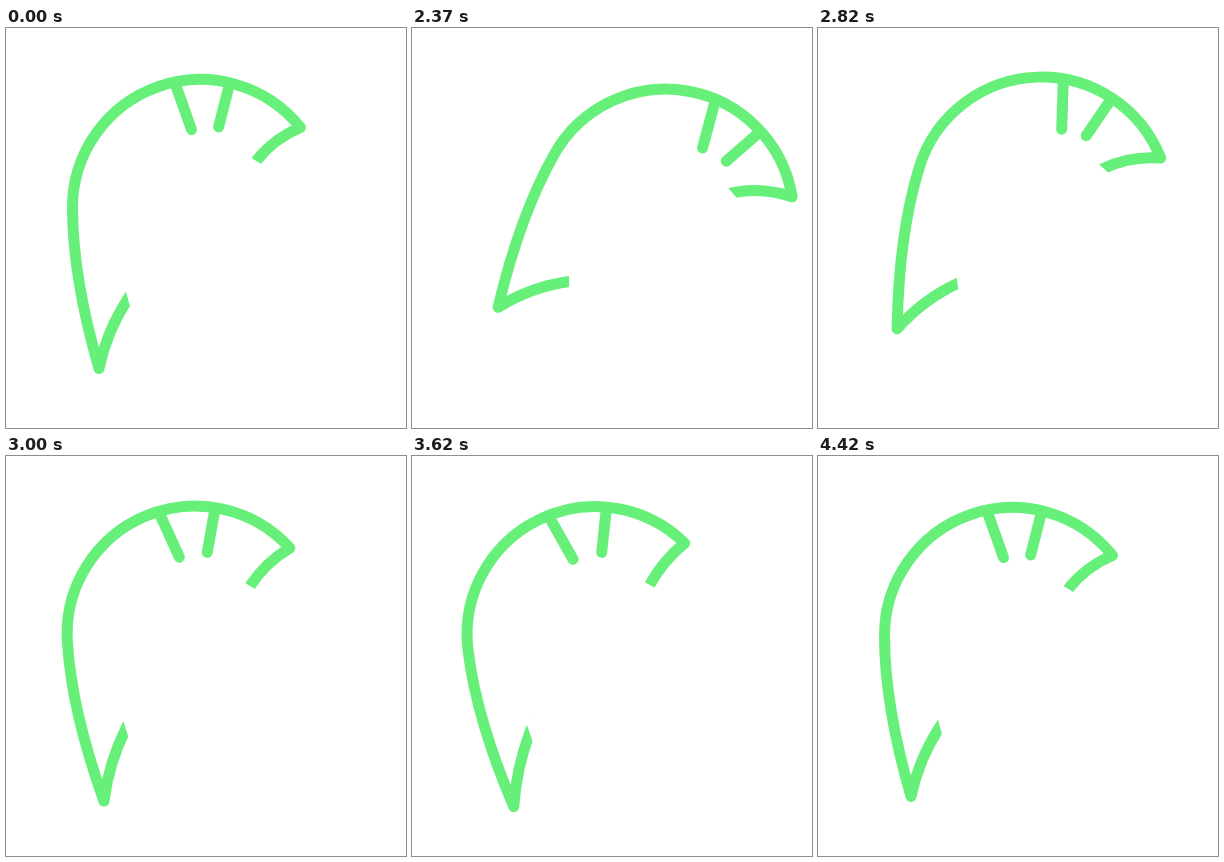
Recreate the animation shown at these times as an HTML page. Size 400 by 400 pixels, loop 4.52 s.

```html
<!DOCTYPE html>
<html lang="en">
<head>
<meta charset="utf-8">
<title>Swinging outline</title>
<style>
html, body { margin: 0; width: 100%; height: 100%; overflow: hidden; background: #fff; }
svg { display: block; width: 100vw; height: 100vh; }
path { fill: none; stroke: #66f07a; stroke-width: 11; stroke-linecap: round; stroke-linejoin: round; }
#line { stroke-linecap: butt; }
#cuts { stroke: #fff; stroke-width: 20; stroke-linecap: butt; }
</style>
</head>
<body>
<svg viewBox="0 0 400 400">
  <path id="line"/>
  <path id="cuts"/>
  <path id="teeth"/>
</svg>
<script>
const LOOP = 4520;
const R = 128;

const add = (a, b, k = 1) => [a[0] + b[0] * k, a[1] + b[1] * k];
const mix = (a, b, k) => a + (b - a) * k;
const polar = (deg, r = 1) => {
  const a = deg * Math.PI / 180;
  return [r * Math.cos(a), r * Math.sin(a)];
};
const turn = ([x, y], deg) => {
  const [c, s] = polar(deg);
  return [x * c - y * s, x * s + y * c];
};
const str = p => p.map(v => v.toFixed(2)).join(' ');

// Time, angle and circle centre, with the easing and bow of the way there
const keys = [
  { t: 2000, angle: 0, c: [194.5, 179.5] },
  { t: 2555, angle: 31.9, c: [258.5, 190], ease: [.3, .2], bow: [0, 0] },
  { t: 3240, angle: -13.2, c: [172.5, 177.5], ease: [.45, .5], bow: [-46, -60] },
  { t: 4060, angle: 1, c: [196.5, 180], ease: [.4, .6], bow: [0, 0] },
  { t: 4440, angle: 0, c: [194.5, 179.5], ease: [.4, .6], bow: [0, 0] }
];

// cubic-bezier(x1, 0, x2, 1)
function bezier([x1, x2], x) {
  let lo = 0, hi = 1;
  for (let i = 0; i < 24; i++) {
    const s = (lo + hi) / 2, u = 1 - s;
    if (3 * u * u * s * x1 + 3 * u * s * s * x2 + s * s * s < x) lo = s; else hi = s;
  }
  return lo * lo * (3 - 2 * lo);
}

function stateAt(t) {
  const i = keys.findIndex(k => t < k.t);
  if (i < 1) return keys[0];
  const from = keys[i - 1], to = keys[i];
  const p = bezier(to.ease, (t - from.t) / (to.t - from.t));
  return {
    angle: mix(from.angle, to.angle, p),
    c: from.c.map((v, j) => mix(v, to.c[j], p) + to.bow[j] * p * (1 - p) ** 2)
  };
}

// Bent stroke from a corner, ended by a slanted white strip
function hook(corner, dir, length, slant, bow, tail) {
  const end = add(corner, polar(dir, length));
  const bend = add(add(corner, polar(dir, length / 2)), polar(dir - 90 * Math.sign(bow), Math.abs(bow)));
  const out = Math.atan2(end[1] - bend[1], end[0] - bend[0]) * 180 / Math.PI;
  const side = Math.sin((out - slant) * Math.PI / 180) > 0 ? 90 : -90;
  const mid = add(end, polar(slant + side, 10));
  return {
    end: str(end), bend: str(bend),
    tail: str(add(end, polar(out, tail))),
    cut: `M${str(add(mid, polar(slant, -13)))}L${str(add(mid, polar(slant, 13)))}`
  };
}

const [line, cuts, teeth] = ['line', 'cuts', 'teeth'].map(id => document.getElementById(id));

function draw(t) {
  const { angle: a, c } = stateAt(t);
  const put = p => add(turn(p, a), c);
  const tooth = (dir, lean, inner) =>
    `M${str(add(c, polar(dir, 124)))}L${str(add(c, polar(dir + lean, inner)))}`;
  const foot = put([-101.5, 161]), tip = put(polar(-38.66, R));
  const [f1, f2, side] = [[-118, 104], [-R, 52], [-R, 0]].map(p => str(put(p)));

  const bow = 8 * (1 - Math.exp(-(a + 15) / 7));
  const swing = Math.sin(2.85 * (a - 9) * Math.PI / 180);
  const low = hook(foot, -51.5 + 37 * swing, 75.5, 74 + .5 * a, bow, 13);
  const high = hook(tip, 143 + 1.8 * a - .014 * a * a, 55.5 + .15 * a, 32 + .55 * a, -bow, 8);

  line.setAttribute('d',
    `M${low.tail}L${low.end}Q${low.bend} ${str(foot)}C${f1} ${f2} ${side}` +
    `A${R} ${R} 0 0 1 ${str(tip)}Q${high.bend} ${high.end}L${high.tail}`);
  cuts.setAttribute('d', low.cut + high.cut);
  teeth.setAttribute('d',
    tooth(-101.4 + 1.36 * a - .0064 * a * a, 4.8, 78.5) + tooth(-76.8 + 1.17 * a, -.5, 82.5));
}

const start = performance.now();
function tick() {
  draw((performance.now() - start) % LOOP);
  requestAnimationFrame(tick);
}
tick();
</script>
</body>
</html>
```
